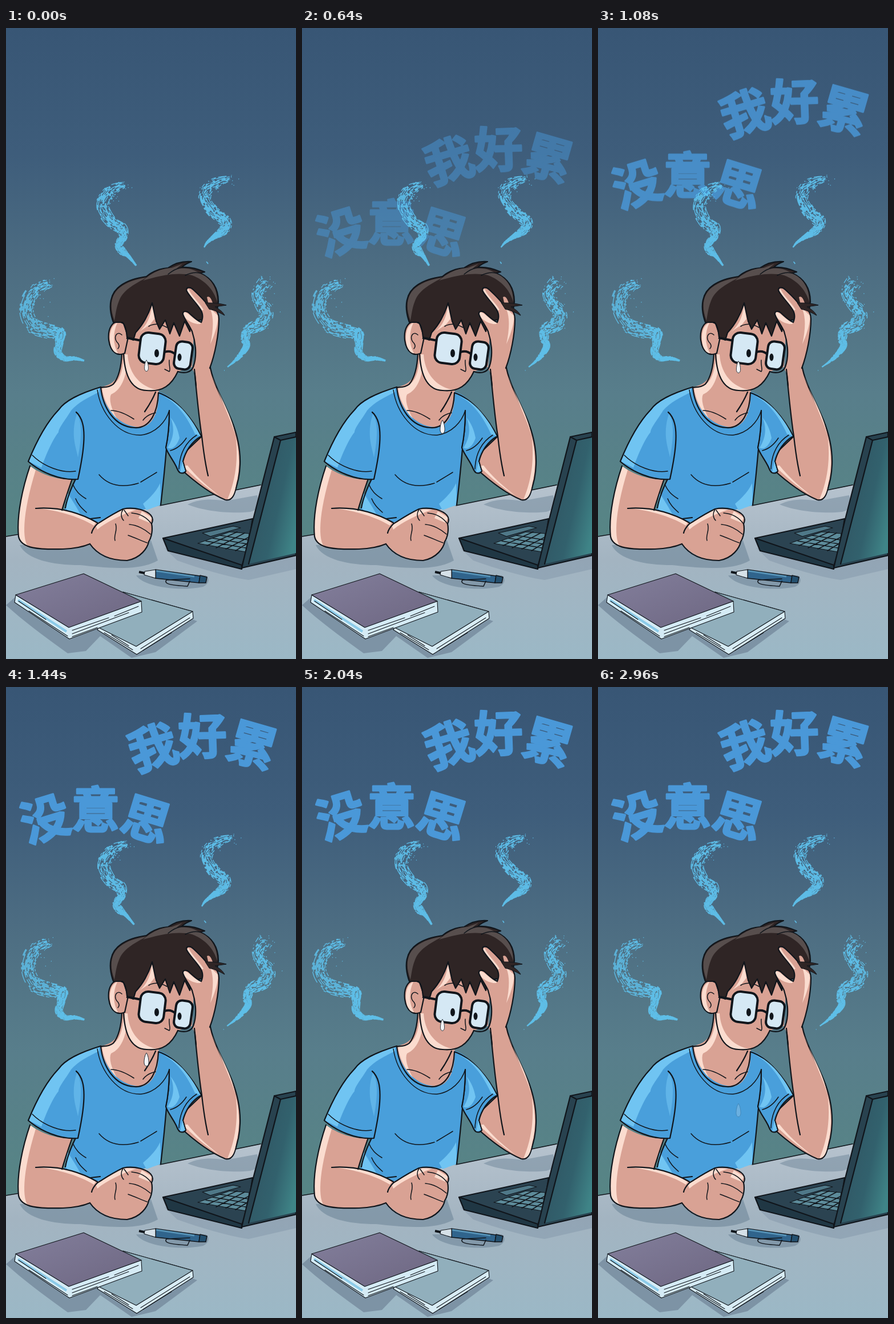
These frames come from a looping animation (508 px wide and 1102 px high, 3000 ms). An HTML page with a canvas:

```html
<!DOCTYPE html>
<html lang="zh">
<head>
<meta charset="utf-8">
<style>
html, body { margin: 0; width: 100%; height: 100%; overflow: hidden; background: #4c6b80; }
svg, canvas { position: absolute; left: 0; top: 0; width: 508px; height: 1102px; }
.ink { fill: none; }
.ink, .out, .fine { stroke: #10151b; stroke-width: 2.2; stroke-linecap: round; stroke-linejoin: round; }
.thin { stroke-width: 1.5; }
.fine { stroke-width: 1.1; }
.skin { fill: #d9a294; }
.glow { fill: #fbdccf; }
.shirt { fill: #499fdb; }
.shine { fill: #70c4f2; }
.shade { fill: #7a90a2; }
.words {
  fill: #4a98d8; stroke: #4a98d8; stroke-width: 3; stroke-linejoin: round; text-anchor: middle;
  font: 900 85px "Noto Sans CJK SC", "Noto Sans CJK", sans-serif;
}
</style>
</head>
<body>
<svg viewBox="0 0 508 1102">
  <defs>
    <linearGradient id="wall" x2="0" y2="1">
      <stop stop-color="#385675"/><stop offset=".2" stop-color="#3e5d7b"/>
      <stop offset=".38" stop-color="#4d6d82"/><stop offset=".58" stop-color="#587e8b"/>
      <stop offset=".8" stop-color="#578585"/>
    </linearGradient>
    <linearGradient id="desk" x2="0" y2="1">
      <stop stop-color="#b8c4cf"/><stop offset=".45" stop-color="#a3b4c1"/><stop offset="1" stop-color="#9bb8c6"/>
    </linearGradient>
    <linearGradient id="lid" x1=".1" y1=".2" x2="1" y2=".75">
      <stop stop-color="#305462"/><stop offset=".6" stop-color="#32616d"/><stop offset="1" stop-color="#3f8487"/>
    </linearGradient>
    <linearGradient id="cover" x2="1" y2="1">
      <stop stop-color="#837f9c"/><stop offset="1" stop-color="#6d6681"/>
    </linearGradient>
  </defs>

  <rect width="508" height="1102" fill="url(#wall)"/>

  <!-- desk and shadows -->
  <path d="M0 888L508 786V1102H0Z" fill="url(#desk)"/>
  <path class="ink thin" d="M0 888L24 884M270 834L446 798"/>
  <path class="shade" d="M318 832C340 822 360 822 385 826L440 816C444 830 442 842 428 845C396 849 346 844 318 832Z" opacity=".6"/>
  <path class="shade" d="M24 903C36 928 80 938 130 938C170 942 230 950 266 930L254 895L150 900Z" opacity=".75"/>
  <path class="shade" d="M277 908L300 930C340 944 385 958 425 964L508 945V915L414 943Z" opacity=".4"/>
  <path class="shade" d="M228 956C240 975 300 985 345 976C358 970 356 960 350 956Z" opacity=".75"/>
  <path class="shade" d="M16 994L0 1008C40 1044 75 1068 108 1092L140 1088L165 1062L220 1100L262 1090L335 1036L240 1000Z" opacity=".9"/>

  <!-- laptop -->
  <path class="out" d="M275 891L345 876L432 857L425 900L413 940Z" fill="#2b4351"/>
  <path class="out" d="M275 891L413 938V945L284 913Z" fill="#203744"/>
  <path class="fine" d="M344 882L398 870L411 873L358 888Z" fill="#4f7888"/>
  <path class="fine" d="M336 900L392 880L426 883L420 915Z" fill="#5d8b9a"/>
  <path class="ink thin" d="M350 896L420 908M362 891L422 901M375 886L424 894M352 904L405 880M368 908L418 882M385 910L424 890M402 913L423 900"/>
  <path class="out" d="M470 714L508 706V921L413 943L432 862Z" fill="#28424f"/>
  <path d="M481 720L508 714V917L425 936Z" fill="url(#lid)"/>
  <path class="ink" d="M470 714L481 720L508 714M481 720L425 936"/>

  <!-- pen -->
  <path class="out thin" d="M262 946L340 957L338 969L262 961Z" fill="#30648c"/>
  <path d="M263 948L330 958" stroke="#5591b5" stroke-width="3"/>
  <path class="fine" d="M262 946L243 949L242 955L262 961Z" fill="#d6e1e8"/>
  <path d="M233 950L243 952" stroke="#10151b" stroke-width="4"/>
  <path class="out thin" d="M340 956L352 959L350 969L338 969Z" fill="#24506f"/>
  <path class="ink thin" d="M322 962L281 964C276 971 288 973 318 975L322 966"/>

  <!-- books -->
  <path class="fine" d="M205 985L327 1019L328 1031L229 1094L160 1051Z" fill="#d8ecf5"/>
  <path class="fine" d="M205 985L327 1019L228 1080L160 1046Z" fill="#91afbc"/>
  <path class="fine" fill="none" d="M236 1084L322 1030M240 1087L290 1056M172 1056L222 1086M185 1060L215 1079"/>
  <path class="fine" d="M17 990L15 1003L111 1067L238 1020L237 1001L110 1046Z" fill="#d5ebf5"/>
  <path class="fine" d="M136 953L237 1001L110 1047L17 990Z" fill="url(#cover)"/>
  <path d="M21 999L106 1054" stroke="#8ccbe9" stroke-width="4"/>
  <path class="fine" fill="none" d="M22 1001L70 1033M40 1018L108 1062M116 1052L180 1030M116 1058L215 1021M116 1063L160 1047M190 1027L232 1010"/>

  <!-- right arm and torso -->
  <path class="skin out" d="M330 596C334 640 338 680 343 713L306 748V770C330 792 355 812 384 824C400 828 402 806 407 788C413 758 410 722 395 685C379 647 362 620 357 588Z"/>
  <path class="glow" d="M360 606C372 640 399 680 403 720C407 760 400 795 388 823C402 820 401 803 405 788C411 758 408 722 393 686Z"/>
  <path class="glow" d="M310 765C330 784 352 804 374 817C352 800 332 782 318 764Z"/>
  <path class="ink" d="M343 713C346 740 350 765 354 782"/>
  <path class="shirt" d="M166 627C130 638 102 650 90 668L130 775C118 795 108 815 102 842L150 866L271 833C275 800 278 770 281 735L320 690C305 660 290 642 267 635Z"/>
  <path class="shine" d="M270 795C262 812 250 822 240 831L246 842L271 833ZM108 812C114 822 125 838 135 858L118 850L103 838Z"/>
  <path class="ink" d="M271 833C275 800 278 770 281 735M126 780C118 795 108 815 104 838M140 858L165 855"/>
  <path class="ink thin" d="M163 780C180 800 205 803 232 795M236 793L264 776M117 797C122 808 128 815 140 822M122 822C126 832 132 838 141 846"/>
  <path class="shirt out" d="M267 637C300 648 328 685 342 713C325 722 314 740 310 757L315 774C310 780 303 778 300 770C295 757 284 745 280 733C284 715 286 690 286 668"/>
  <path class="shine" d="M276 643C300 655 318 680 331 709L341 713C327 684 303 652 276 643ZM288 680C296 698 294 716 283 733C292 738 300 728 304 716C301 700 296 690 288 680ZM309 757L314 774L305 776Z"/>
  <path class="ink thin" d="M334 711C316 722 304 742 303 770M286 668C287 695 284 715 280 733M288 738C300 735 310 725 316 716"/>

  <!-- left sleeve -->
  <path class="shirt" d="M92 666C68 692 50 730 39 757C60 775 95 791 126 788C132 760 141 715 134 690C131 680 127 672 116 664Z"/>
  <path class="shine" d="M163 629C130 638 104 650 92 667C68 692 50 730 40 757L62 768C70 745 82 718 92 706C92 698 106 682 114 668C126 654 146 644 163 636Z"/>
  <path class="shine" d="M124 674C132 684 134 710 126 750C124 735 112 712 124 674Z" opacity=".6"/>
  <path class="ink" d="M166 627C130 638 104 650 92 667C68 692 50 730 39 757C60 775 95 791 126 788C132 760 141 715 134 690C132 682 127 674 123 671"/>
  <path class="ink thin" d="M46 746C66 766 98 778 122 774"/>

  <!-- neck and collar -->
  <path class="skin" d="M203 565C204 600 196 622 166 627C172 670 205 700 240 697C260 690 270 665 267 625Z"/>
  <path class="glow" d="M206 575C204 604 198 628 168 628C171 648 180 668 194 682C184 664 180 648 184 640C202 632 210 610 211 590Z"/>
  <path class="ink" d="M203 568C202 590 198 610 188 622C178 630 169 626 166 628C170 664 190 696 225 698C254 700 266 668 267 637M262 636C256 650 250 660 243 670"/>
  <path class="ink thin" d="M160 632C166 672 196 712 236 711C262 708 280 688 286 668M184 668C196 668 210 674 224 683M262 672C252 674 245 678 240 685"/>

  <!-- left arm -->
  <path class="skin" d="M42 765C30 800 18 850 22 888C26 910 60 911 100 910C125 909 140 904 148 902C165 920 185 930 212 930C236 926 248 908 251 896C256 886 258 874 256 864C260 854 252 846 236 841L205 839C185 850 172 860 160 864C140 850 116 844 98 842C103 825 108 810 116 789C90 789 62 780 42 765Z"/>
  <path class="glow" d="M42 765C30 800 18 850 22 888C26 900 32 905 40 907C28 896 28 850 52 772ZM52 838C88 836 130 846 157 864L154 869C125 851 85 842 52 838ZM205 840L228 841C203 850 176 862 160 876L157 868C172 862 186 848 205 840ZM238 844L256 855L251 864L232 856Z"/>
  <path class="ink" d="M42 765C30 800 18 850 22 888C26 910 60 911 100 910C125 909 140 904 147 901M52 839C92 836 128 846 160 864M98 842C103 825 108 810 115 790M147 901C160 920 182 930 212 930C236 926 248 908 250 897C256 888 257 874 255 866C261 854 252 846 236 841C224 838 214 838 205 840C184 850 170 860 160 866C154 872 151 877 150 882"/>
  <path class="ink thin" d="M205 841C200 848 202 856 206 860M220 847C234 848 246 854 255 866M216 867C230 868 244 876 253 884M214 886C226 890 238 896 247 899M192 866C196 878 188 886 191 895M207 842L214 852"/>

  <!-- face -->
  <path class="skin" d="M204 500L207 572C208 604 218 632 246 633C274 636 292 622 301 600L326 592L330 510L260 450Z"/>
  <path class="glow" d="M208 570C208 604 218 632 246 633C254 634 260 633 266 632C236 628 215 604 213 570ZM256 480C254 505 246 520 234 530L252 518L260 508Z"/>
  <path class="ink" d="M206 570C208 604 218 632 246 633C274 636 290 624 301 600"/>
  <path class="skin out" d="M206 516C186 506 178 526 180 545C183 566 195 574 208 568L214 540Z"/>
  <path class="glow" d="M195 515C182 520 180 540 184 556C188 566 193 568 196 568C187 552 187 532 195 515Z"/>
  <path class="ink thin" d="M203 536C194 528 188 540 194 548C198 552 200 556 196 560M250 521C260 515 272 517 282 523M286 580C285 590 289 597 286 600L278 596"/>

  <!-- hair -->
  <path class="out" d="M188 514C178 486 182 462 202 449C216 439 232 436 246 434C258 424 270 420 284 419C298 409 312 407 325 408C316 411 312 414 308 418C322 417 337 421 348 426L340 428C362 438 372 455 372 478L368 506L325 512L322 530L313 512L304 538L294 515L287 534L279 510L269 526L263 512L256 480C250 500 240 518 227 532L223 545L212 540C211 528 208 518 204 514Z" fill="#2f2525"/>
  <path d="M190 511C180 485 184 462 204 450C218 441 232 438 246 436C228 446 208 455 199 474C193 488 192 500 190 511ZM250 433C268 421 280 420 290 419L309 412C303 417 300 418 299 421C318 417 332 423 338 428C360 436 370 455 370 478C364 458 350 441 326 432C300 426 272 432 240 441Z" fill="#574e4d"/>
  <path class="ink thin" d="M308 418C298 420 290 425 284 430M340 428C330 426 322 428 314 432"/>

  <!-- glasses -->
  <g fill="#d5e8f4" stroke="#10151b" stroke-width="4">
    <rect x="234" y="533" width="44" height="53" rx="13" transform="rotate(7 256 560)"/>
    <rect x="296" y="548" width="29" height="48" rx="10" transform="rotate(8 311 572)"/>
    <path d="M211 541L237 546M278 566Q288 562 297 570" fill="none"/>
  </g>
  <ellipse cx="264" cy="568" rx="4" ry="7" fill="#10151b"/>
  <ellipse cx="304" cy="575" rx="3.5" ry="6.5" fill="#10151b"/>

  <!-- hand -->
  <path class="skin" d="M326 594C338 570 331 545 326 530C322 520 312 508 310 500C309 494 316 493 322 499C330 506 336 512 342 514C345 507 346 500 341 492C332 478 320 468 316 458C316 452 323 452 328 457C340 468 350 478 356 488L352 470C358 466 362 478 364 488C370 494 373 500 373 508C373 535 366 570 357 594L345 612L330 602Z"/>
  <path class="glow" d="M316 458C320 470 335 482 342 494L346 492C338 478 326 470 320 456ZM310 500C312 508 328 518 340 517L342 514C330 512 322 498 312 496ZM356 488C363 498 365 520 358 552C368 530 372 512 371 502Z"/>
  <path class="ink" d="M301 600C312 604 324 602 328 592C336 570 331 545 326 530C322 520 312 508 310 500C309 494 316 493 322 499C330 506 336 512 342 514C345 507 346 500 341 492C332 478 320 468 316 458C316 452 323 452 328 457C340 468 350 478 356 488M364 488C370 494 373 500 373 508C373 535 366 570 357 594M330 596L333 625"/>
  <path d="M349 480C360 480 372 480 386 484L366 487C374 491 380 496 383 502C374 497 366 493 356 491Z" fill="#2f2525" stroke="#10151b"/>

  <g id="words" class="words"></g>
  <path id="tear" d="M0-12C3-8 4.4 1 4 6C3 13-3 13-4 6C-4.4 1-3-8 0-12Z" fill="#f4f4f6" stroke="#222c36" stroke-width="1"/>
</svg>
<canvas id="steam" width="508" height="1102"></canvas>

<script>
const LOOP = 3000, STEP = 40, TAU = Math.PI * 2;
const words = document.getElementById('words');
const tear = document.getElementById('tear');
const ctx = document.getElementById('steam').getContext('2d');

// glyph, centre x, centre y, tilt
const glyphs = [
  ['我', 257, 100, -17], ['好', 344, 80, -2], ['累', 432, 96, 16],
  ['没', 68, 225, -17], ['意', 157, 209, 0], ['思', 246, 226, 17]
];
words.innerHTML = glyphs.map(([c, x, y, a]) =>
  `<text transform="translate(${x} ${y}) rotate(${a})" dy=".38em">${c}</text>`).join('');

let seed = 11;
function random() {
  seed = (seed * 16807) % 2147483647;
  return seed / 2147483647;
}

const ease = p => (1 - Math.cos(Math.PI * p)) / 2;

// Horizontal sway travelling upwards.
const sway = (y, t) => 5 * Math.cos(TAU * (t - 840 + 6.5 * (y - 310)) / 1667);

// Spine points: x, y, brush width
const plumes = [
  [[208, 273, 10], [184, 284, 20], [169, 310, 23], [182, 336, 20], [202, 350, 20], [205, 364, 15], [197, 379, 12], [204, 390, 13], [214, 398, 6], [228, 415, 2]],
  [[392, 262, 8], [362, 274, 20], [348, 296, 21], [364, 322, 20], [384, 338, 20], [382, 352, 17], [366, 364, 9], [353, 374, 4], [347, 383, 1]],
  [[78, 445, 14], [49, 460, 24], [35, 490, 25], [45, 518, 26], [72, 529, 25], [94, 533, 20], [93, 550, 14], [91, 566, 13], [102, 577, 9], [120, 577, 6], [137, 581, 2]],
  [[457, 442, 26], [441, 461, 20], [447, 481, 23], [457, 500, 25], [446, 517, 22], [425, 527, 18], [419, 543, 14], [421, 556, 11], [409, 573, 8], [398, 584, 3], [388, 592, 1]]
];

function spline(a, b, c, d, u) {
  return b + u / 2 * (c - a + u * (2 * a - 5 * b + 4 * c - d + u * (3 * (b - c) + d - a)));
}

function sampleSpine(points) {
  const at = i => points[Math.max(0, Math.min(points.length - 1, i))], out = [];
  for (let i = 0; i < points.length - 1; i++)
    for (let u = 0; u < 1; u += 0.1)
      out.push([0, 1, 2].map(k => spline(at(i - 1)[k], at(i)[k], at(i + 1)[k], at(i + 2)[k], u)));
  return out;
}

const marks = [];
function mark(x1, y1, x2, y2) {
  marks.push([x1 - sway(y1, 0), y1, x2 - sway(y2, 0), y2]);
}

// Dry brush: broken bristle strands along each spine, with specks at the thin end.
for (const points of plumes) {
  const spine = sampleSpine(points), n = spine.length;
  const edge = (i, off) => {
    const [x, y, w] = spine[i], [px, py] = spine[Math.max(0, i - 1)], [nx, ny] = spine[Math.min(n - 1, i + 1)];
    const len = Math.hypot(nx - px, ny - py) || 1;
    return [x - (ny - py) / len * w * off, y + (nx - px) / len * w * off];
  };
  for (let s = 0; s < 17; s++) {
    const off = s / 16 - 0.5;
    let on = false;
    for (let i = 0; i < n - 1; i++) {
      const cover = 0.55 + 0.45 * Math.min(1, i / n * 1.5) - Math.abs(off) * 0.6;
      if (random() < 0.7) on = random() < cover;
      if (on) mark(...edge(i, off), ...edge(i + 1, off));
    }
  }
  for (let k = 0; k < 26; k++) {
    const [x, y] = edge(Math.floor(random() * random() * n * 0.5), (random() - 0.5) * 1.5);
    const dx = random() * random() * 24;
    mark(x + dx, y, x + dx + 1, y + 0.5);
  }
}
mark(351, 408, 354, 412);
mark(352, 409, 354, 411);
mark(382, 598, 383, 598);

function drawSteam(t) {
  ctx.clearRect(0, 0, 508, 1102);
  ctx.strokeStyle = 'rgba(96,200,244,.88)';
  ctx.lineWidth = 1.35;
  ctx.beginPath();
  for (const [x1, y1, x2, y2] of marks) {
    ctx.moveTo(x1 + sway(y1, t), y1);
    ctx.lineTo(x2 + sway(y2, t), y2);
  }
  ctx.stroke();
}

function render(t) {
  const rise = ease(Math.min(1, t / 1600));
  words.setAttribute('transform', `translate(0 ${200 * (1 - rise)})`);
  words.setAttribute('opacity', Math.min(1, t / 1300));

  const p = t % 1000 / 1000;
  tear.setAttribute('transform', `translate(246 ${590 + 150 * ease(p)}) scale(${0.85 + 0.15 * Math.min(1, p / 0.3)})`);
  tear.setAttribute('opacity', Math.min(1, (1 - p) / 0.2));

  drawSteam(t);
}

function tick() {
  render(Math.floor(performance.now() % LOOP / STEP) * STEP);
  requestAnimationFrame(tick);
}
tick();
</script>
</body>
</html>
```
